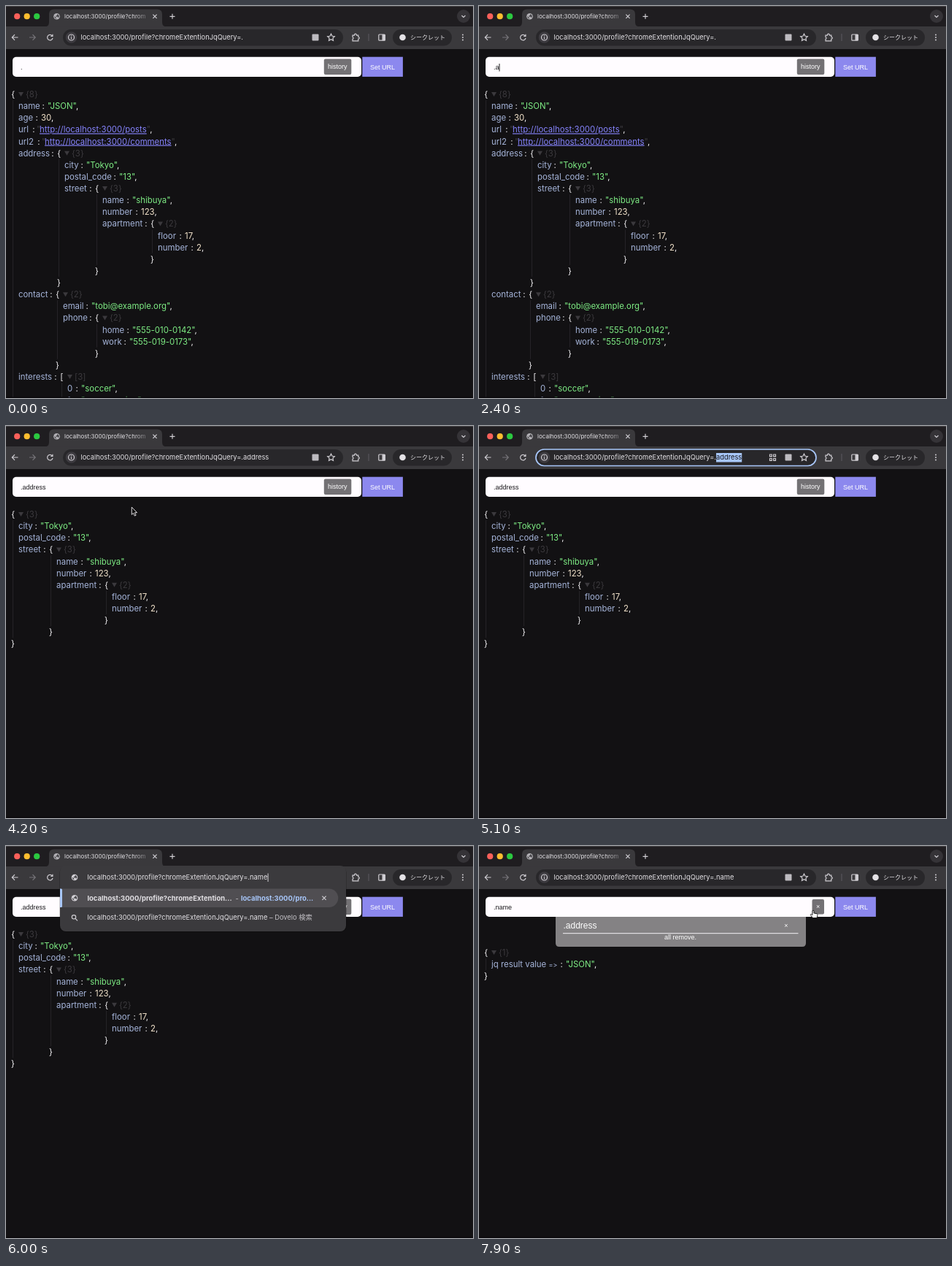
Recreate the animation shown at these times as an HTML page. Size 640x537 px, loop 8 s.

```html
<!DOCTYPE html>
<html lang="ja">
<head>
<meta charset="utf-8">
<title>JSON viewer</title>
<style>
html, body { margin: 0; width: 100%; height: 100%; overflow: hidden; background: #121113; }
svg { display: block; width: 100vw; height: 100vh; }
text { font: 9.3px Inter, "Noto Sans CJK JP", "Noto Sans CJK", sans-serif; fill: #e3e1e5;
  font-variant-ligatures: none; font-feature-settings: "calt" 0; white-space: pre; }
.tree text { font-size: 11.4px; fill: #f4f2f5; }
.tree .key { fill: #a6b5da; }
.tree .str { fill: #7eec84; }
.tree .num { fill: #f3e3cb; }
.tree .link { fill: #8583fb; text-decoration: underline; }
.tree .dim { fill: #3b393d; }
.ui { font: 9px "Liberation Sans", Arial, sans-serif; }
.bold { font-size: 9.45px; font-weight: 700; }
.icon { fill: none; stroke: #cfcdd2; stroke-width: 1.2; }
</style>
</head>
<body>
<svg viewBox="0 0 640 537" preserveAspectRatio="none">
  <defs>
    <linearGradient id="fade" gradientUnits="userSpaceOnUse" x1="174" x2="197" y1="0" y2="0">
      <stop stop-color="#e3e1e5"/><stop offset="1" stop-color="#e3e1e5" stop-opacity="0.1"/>
    </linearGradient>
    <g id="globe">
      <circle r="4.3" fill="#d2d0d5"/>
      <path d="M-3.4-.6L-.8 1.6V3.4Q-3.2 2.6-3.4-.6ZM.9-3.3Q3.4-2.2 3.4 .6L2.2 1.8 1.4.4H-1L-1.2-.9.2-1.3Z" fill="#4a494d"/>
    </g>
    <path id="cross" d="M-2.6-2.6L2.6 2.6M2.6-2.6L-2.6 2.6" class="icon"/>
  </defs>

  <rect width="640" height="537" fill="#121113"/>
  <g id="trees" class="tree"></g>
  <rect y="535.6" width="640" height="1.4" fill="#08070a"/>

  <!-- page form -->
  <rect x="9" y="69.7" width="478" height="27.2" rx="5" fill="#fffcff"/>
  <text id="query" class="ui" x="20" y="87" style="fill:#1a181c"></text>
  <rect id="caret" y="79" width="0.9" height="10.5" fill="#000"/>
  <rect x="488.3" y="69.7" width="55.6" height="27.2" fill="#8c88ee"/>
  <text class="ui" x="499" y="86.5" style="fill:#fff">Set URL</text>
  <g id="history">
    <rect x="435.8" y="72.5" width="37.5" height="21.5" rx="2" fill="#737174"/>
    <text class="ui" x="441" y="86.3" style="fill:#fff">history</text>
  </g>
  <g id="panel">
    <rect x="456.5" y="73" width="16.5" height="20.5" rx="2" fill="#737174"/>
    <text class="ui" x="464.7" y="86.3" text-anchor="middle" style="fill:#fff">×</text>
    <path d="M105 97H448V133Q448 138 443 138H110Q105 138 105 133Z" fill="#848284"/>
    <text class="ui" x="115.5" y="113.3" style="fill:#fff;font-size:12px">.address</text>
    <text class="ui" x="421" y="112" text-anchor="middle" style="fill:#fff">×</text>
    <path d="M115 119.7H437.5" stroke="#f4f2f5"/>
    <text class="ui" x="254" y="128.3" style="fill:#fff">all remove.</text>
  </g>

  <!-- browser window -->
  <rect width="640" height="29" fill="#1f1d20"/>
  <rect width="640" height="0.8" fill="#4b494d"/>
  <rect y="28" width="640" height="31" fill="#3a393c"/>
  <path d="M53 28.5Q59 28.5 59 22V11Q59 4.5 66 4.5H207Q214 4.5 214 11V22Q214 28.5 220 28.5Z" fill="#3a393c"/>
  <circle cx="15.2" cy="14.2" r="4.1" fill="#f9605a"/>
  <circle cx="28.7" cy="14.2" r="4.1" fill="#fbbd2f"/>
  <circle cx="42.2" cy="14.2" r="4.1" fill="#2bc840"/>
  <use href="#globe" x="69.5" y="14.3" opacity="0.8"/>
  <text x="80" y="17.2" style="font-size:8px;fill:url(#fade)">localhost:3000/profile?chrom</text>
  <use href="#cross" x="204" y="14.3"/>
  <path class="icon" d="M224.5 14.3H231.5M228 10.8V17.8"/>
  <circle cx="627" cy="14" r="9" fill="#353337"/>
  <path class="icon" d="M624.5 13L627 15.4L629.5 13"/>
  <path class="icon" d="M16.5 43H8.5M12 39.2L8.3 43L12 46.8"/>
  <path class="icon" d="M32 43H40M36.5 39.2L40.2 43L36.5 46.8" style="stroke:#77757a"/>
  <path class="icon" d="M63.2 40.8A3.7 3.7 0 1 0 64 43.8M63.9 38.8V41.5H61.2"/>
  <rect x="78" y="32" width="384" height="22.5" rx="11.2" fill="#28272a"/>
  <rect id="ring" x="78" y="32" width="384" height="22.5" rx="11.2" fill="none" stroke="#a8c7fa" stroke-width="1.7"/>
  <circle cx="89.5" cy="43" r="7.8" fill="#3d3b40"/>
  <circle class="icon" cx="89.5" cy="43" r="4"/>
  <path class="icon" d="M89.5 42.5V45.3M89.5 40.6V41.6"/>
  <rect id="mark" y="37" height="12.5" fill="#a8c7fa"/>
  <text x="102.5" y="46.3"><tspan id="url"></tspan><tspan id="picked" fill="#17161a"></tspan></text>
  <path id="tiles" class="icon" d="M398.5 39H401.3V41.8H398.5ZM403.7 39H406.5V41.8H403.7ZM398.5 44.5H401.3V47.3H398.5ZM403.7 44.5H406.5V47.3H403.7Z"/>
  <rect x="419.5" y="38.5" width="9" height="9" rx="1" fill="#bdbbc0"/>
  <path class="icon" d="M445.5 38.2L447 41.3 450.3 41.7 447.9 44 448.5 47.3 445.5 45.7 442.5 47.3 443.1 44 440.7 41.7 444 41.3Z"/>
  <path class="icon" d="M475 40.2H477.5V39.5A1.3 1.3 0 0 1 480.3 39.5V40.2H482.8V42.5H483.4A1.3 1.3 0 0 1 483.4 45H482.8V47.8H475V45.3A1.5 1.5 0 0 0 475 42.5Z"/>
  <path d="M497 38V48" stroke="#5c5a60"/>
  <rect class="icon" x="510.8" y="39" width="8.6" height="8.2" rx="1"/>
  <rect x="515.5" y="39" width="4" height="8.2" fill="#cfcdd2"/>
  <rect x="530" y="32" width="81" height="22.5" rx="11.2" fill="#28272a"/>
  <circle cx="543.5" cy="43" r="4.3" fill="#e3e1e5"/>
  <text x="554" y="46" style="font-size:8px">シークレット</text>
  <g fill="#cfcdd2"><circle cx="626" cy="39.4" r="1"/><circle cx="626" cy="43" r="1"/><circle cx="626" cy="46.6" r="1"/></g>

  <!-- address suggestions -->
  <g id="suggest">
    <rect x="73.3" y="28" width="393.4" height="90" rx="8.5" fill="#000" opacity="0.25"/>
    <rect x="74" y="27" width="392" height="90" rx="8" fill="#3b3a3d"/>
    <path d="M74 58.5H442.500A12.700 12.700 0 0 1 442.500 84H74Z" fill="#504e52"/>
    <path d="M74 58.5H75.5Q77 58.5 77 60V82.5Q77 84 75.5 84H74Z" fill="#a8c7fa"/>
    <use href="#globe" x="94" y="43"/>
    <use href="#globe" x="94" y="71.3"/>
    <g class="icon"><circle cx="93" cy="97.3" r="2.7"/><path d="M95 99.3L98 102.3"/></g>
    <text id="typed" x="111.5" y="46.3"></text>
    <rect id="urlCaret" y="37.5" width="0.9" height="11.5" fill="#e3e1e5"/>
    <text class="bold" x="111.5" y="74.8">localhost:3000/profile?chromeExtention...</text>
    <text x="314.5" y="74.8" style="fill:#c3c1c6">-</text>
    <text class="bold" x="322" y="74.8" style="fill:#a8c7fa">localhost:3000/pro...</text>
    <use href="#cross" x="436" y="71.3"/>
    <text y="101"><tspan id="search" x="111.5"></tspan><tspan fill="#c3c1c6"> – Dovelo 検索</tspan></text>
  </g>

  <!-- pointers -->
  <g id="arrow"><path d="M0 0V10.3L2.4 8.2 4 12 5.8 11.2 4.2 7.6H7.3Z" fill="#0a0a0a" stroke="#f2f0f3" stroke-width="0.9"/></g>
  <g id="beam"><path d="M-2-5Q0-5 0-3.5Q0-5 2-5M0-3.5V3.5M-2 5Q0 5 0 3.5Q0 5 2 5" fill="none" stroke="#777"/></g>
  <g id="hand"><path d="M-1 .8Q0-.7 1 .8V4L5.2 4.8Q6.3 5.2 6 6.6L5 10.5H-.5L-3.6 6.6Q-3.7 5-2.2 5.5L-1 6.5Z" fill="#fff" stroke="#111" stroke-width="0.9"/></g>
</svg>
<script>
const LOOP = 8000, BASE = "localhost:3000/profile?chromeExtentionJqQuery=";
const el = id => document.getElementById(id);
const show = (id, on) => el(id).setAttribute("display", on ? "inline" : "none");
const set = (id, text) => { if (el(id).textContent !== text) el(id).textContent = text; };
const width = id => el(id).getComputedTextLength();

// rows: [key x, key, value x, value, child count]; "}" closes the innermost bracket
const address = [
  [80, "city", 110, '"Tokyo"'],
  [80, "postal_code", 155, '"13"'],
  [80, "street", 123, "{", 3],
  [132, "name", 173, '"shibuya"'],
  [132, "number", 185, "123"],
  [132, "apartment", 199, "{", 2],
  [208, "floor", 245, "17"],
  [208, "number", 261, "2"],
  "}", "}", "}"
];
const profile = [
  [0, "", 8, "{", 8],
  [17, "name", 57, '"JSON"'],
  [17, "age", 48, "30"],
  [17, "url", 46, "http://localhost:3000/posts"],
  [17, "url2", 53, "http://localhost:3000/comments"],
  [17, "address", 71, "{", 3],
  ...address,
  [17, "contact", 69, "{", 2],
  [78, "email", 117, '"tobi@example.org"'],
  [78, "phone", 123, "{", 2],
  [132, "home", 173, '"555-010-0142"'],
  [132, "work", 169, '"555-019-0173"'],
  "}", "}",
  [17, "interests", 75, "[", 3],
  [84, "0", 103, '"soccer"'],
  [84, "1", 103, '"programming"']
];
const result = [[0, "", 8, "{", 1], [17, "jq result value", 119, '"JSON"'], "}"];

const isLink = text => text.startsWith("http");
const label = (x, y, text, cls = "") => `<text x="${x}" y="${y}" class="${cls}">${text}</text>`;

function value(x, y, text) {
  if (isLink(text))
    return label(x - 4, y, '"', "dim") +
      `<text x="${x}" y="${y}"><tspan class="link">${text}</tspan><tspan class="dim">"</tspan>,</text>`;
  const cls = text[0] === '"' ? "str" : "num";
  return `<text x="${x}" y="${y}"><tspan class="${cls}">${text}</tspan>,</text>`;
}

function tree(id, rows, dx = 0) {
  const open = [], top = i => 129 + 16.125 * i;
  const guide = (x, a, b) => `<path d="M${x + 1.5} ${top(a)}V${top(b)}" stroke="#252327"/>`;
  let out = "";
  rows.forEach((row, i) => {
    const y = 125 + 16.125 * i;
    if (row === "}") {
      const [x, from] = open.pop();
      out += label(x - 1, y, "}") + guide(x, from, i - 1);
      return;
    }
    const [kx, key, vx, val, count] = row, x = vx + dx;
    const gap = isLink(val) ? 9.8 : count ? 8.8 : 7.6;
    if (key) out += label(kx + dx, y, key, "key") + label(x - gap, y, ":");
    if (!count) { out += value(x, y, val); return; }
    open.push([x, i]);
    out += label(x - 0.7, y, val) + label(x + 19, y, val === "[" ? `[${count}]` : `{${count}}`, "dim") +
      `<path d="M${x + 9} ${y - 7}h7l-3.5 6z" fill="#3b393d"/>`;
  });
  open.forEach(([x, from]) => out += guide(x, from, rows.length));
  return `<g id="${id}">${out}</g>`;
}

el("trees").innerHTML = tree("full", profile) +
  tree("part", [[0, "", 71, "{", 3], ...address], -63) +
  tree("single", result);
el("single").insertAdjacentHTML("beforeend",
  '<text x="95.5" y="141" class="key" style="font-size:9px">=&gt;</text>');

// pointer trips: each a list of [time, x, y]
const trips = [
  [[1000, 190, 220], [1200, 83, 103], [1500, 92, 112], [1800, 104, 116], [2100, 62, 85], [2300, 62, 85]],
  [[4000, 62, 85], [4300, 210, 120], [4700, 346, 44], [5000, 346, 44]],
  [[6600, 346, 44], [7000, 394, 115], [7250, 394, 115], [7500, 458, 88], [8000, 458, 88]]
];

function pointer(t) {
  const trip = trips.find(p => t >= p[0][0] && t < p[p.length - 1][0]);
  if (!trip) return null;
  const i = trip.findIndex(p => p[0] > t), [t0, x0, y0] = trip[i - 1], [t1, x1, y1] = trip[i];
  const u = (t - t0) / (t1 - t0), e = u * u * (3 - 2 * u);
  return [x0 + (x1 - x0) * e, y0 + (y1 - y0) * e];
}

function kind([x, y]) {
  if (x > 436 && x < 474 && y > 72 && y < 94) return "hand";
  const field = (y > 70 && y < 97 && x > 9 && x < 487) || (y > 32 && y < 54 && x > 78 && x < 462);
  return field ? "beam" : "arrow";
}

const typedPart = (text, t, start, step) =>
  text.slice(0, Math.max(0, Math.floor((t - start) / step) + 1));

function draw(t) {
  const filtered = t >= 3500, typing = t >= 5600 && t < 6300, named = t >= 6400;
  const panel = t >= 7700;

  show("full", !filtered);
  show("part", filtered && !named);
  show("single", named);
  el("single").setAttribute("transform", `translate(0 ${panel ? 25 : 0})`);
  show("history", !panel);
  show("panel", panel);

  set("query", named ? ".name" : "." + typedPart("address", t, 2300, 150));
  const lastKey = t < 2300 ? 2100 : Math.min(3200, 2300 + Math.floor((t - 2300) / 150) * 150);
  show("caret", t >= 2100 && t < 4800 && (t - lastKey) % 1100 < 600);
  el("caret").setAttribute("x", 20 + width("query"));

  // address bar: first click selects all, the second one the last word
  const focus = t >= 4800 && t < 5600, all = focus && t < 4950;
  const url = BASE + (t >= 5600 ? ".name" : filtered ? ".address" : ".");
  const cut = !focus ? url.length : all ? 0 : BASE.length + 1;
  set("url", url.slice(0, cut));
  set("picked", url.slice(cut));
  show("ring", focus);
  show("tiles", focus);
  show("mark", focus);
  if (focus) {
    el("mark").setAttribute("x", 102.5 + (cut ? width("url") : 0));
    el("mark").setAttribute("width", width("picked"));
  }

  show("suggest", typing);
  if (typing) {
    const text = BASE + "." + typedPart("name", t, 5600, 100);
    set("typed", text);
    set("search", text);
    el("urlCaret").setAttribute("x", 111.8 + width("typed"));
  }

  const at = pointer(t), shape = at && kind(at);
  for (const id of ["arrow", "beam", "hand"]) {
    show(id, id === shape);
    if (id === shape) el(id).setAttribute("transform", `translate(${at[0]} ${at[1]})`);
  }
}

const begin = performance.now();
function frame() {
  draw((performance.now() - begin) % LOOP);
  requestAnimationFrame(frame);
}
frame();
</script>
</body>
</html>
```
